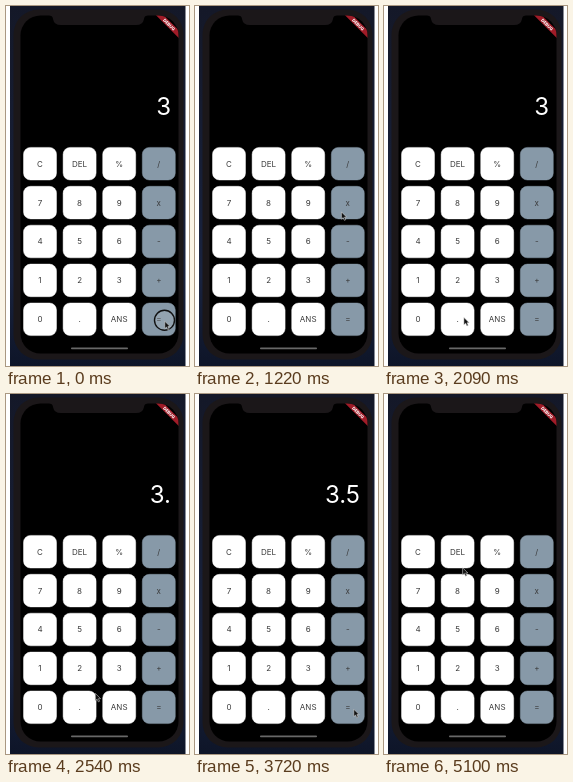
Recreate the animation shown at these times as an HTML page. Size 183 by 360 pixels, loop 5.17 s.

```html
<!DOCTYPE html>
<html lang="en">
<head>
<meta charset="utf-8">
<title>Calculator</title>
<style>
html, body { margin: 0; width: 100%; height: 100%; overflow: hidden; background: #fff; }
svg { display: block; width: 100vw; height: 100vh; }
text { font-family: Inter, Roboto, sans-serif; }
.key { font-size: 8px; fill: #3a3a3a; text-anchor: middle; }
#display { font-size: 24px; fill: #fff; text-anchor: end; }
#debug { font-size: 4.3px; font-weight: 800; fill: #fff; text-anchor: middle; }
</style>
</head>
<body>
<svg viewBox="0 0 183 360" preserveAspectRatio="none">
  <defs>
    <linearGradient id="desk" x1="0" y1="0" x2="0" y2="1">
      <stop offset="0" stop-color="#141828"/>
      <stop offset=".75" stop-color="#19233f"/>
      <stop offset="1" stop-color="#0e1528"/>
    </linearGradient>
    <clipPath id="screen"><rect x="14.5" y="9.5" width="158" height="338" rx="20"/></clipPath>
  </defs>
  <rect x="4" width="175.5" height="360" fill="url(#desk)"/>
  <rect x="7.5" y="3.5" width="170" height="350" rx="25" fill="#1b1719"/>
  <g clip-path="url(#screen)">
    <rect x="14" y="9" width="160" height="340"/>
    <g transform="translate(163.2 18.6) rotate(45)">
      <rect x="-22" y="-2.7" width="44" height="5.4" fill="#a01c28"/>
      <text id="debug" y="1.6">DEBUG</text>
    </g>
  </g>
  <path d="M43 9H142Q138 10 138 13Q137 19 130 19H55Q48 19 47 13Q47 10 43 9Z" fill="#1b1719"/>
  <g id="keys"></g>
  <rect x="65" y="341.5" width="57" height="1.7" rx=".8" fill="#686868"/>
  <text id="display" x="165" y="108.5"></text>
  <g id="pointer">
    <circle id="ring" cx="-.3" cy="-1" r="10" fill="#fff" fill-opacity=".1" stroke="#111" stroke-width="1.4"/>
    <path transform="scale(.88)" d="M0 0V8.3L2 6.5L3.4 9.6L4.9 8.9L3.5 6H6Z" fill="#111" stroke="#ddd" stroke-width=".6" stroke-linejoin="round"/>
  </g>
</svg>
<script>
const LOOP = 5170, HOLD = 140, MOVE = 420, SETTLE = 110;
const $ = id => document.getElementById(id);

const rows = ["C DEL % /", "7 8 9 x", "4 5 6 -", "1 2 3 +", "0 . ANS ="];
const centre = {};
$("keys").innerHTML = rows.map((row, r) => row.split(" ").map((label, c) => {
  const x = 34 + c * 39.6, y = 157.7 + r * 38.9, fill = c === 3 ? "#8799a8" : "#fff";
  centre[label] = [x, y];
  return `<rect x="${x - 16.5}" y="${y - 16.3}" width="33" height="32.6" rx="7"
      fill="${fill}" stroke="${fill}" stroke-opacity=".45"/>
    <text class="key" x="${x}" y="${y + 2.9}">${label}</text>`;
}).join("")).join("");

// Key, press time, where on the key the pointer lands, sideways bow of the way there
const step = (key, at, dx, dy, bow = 0) =>
  ({ key, at, bow, x: centre[key][0] + dx, y: centre[key][1] + dy });
const steps = [
  step("=", 0, 6, 2),
  step("x", 943, -3, 3, -25),
  step("3", 1680, -8, 8),
  step(".", 2290, 3, 2),
  step("5", 2948, 3, 3, 16),
  step("=", 3780, 6, 2),
  step("/", 4613, -3, 6, -10),
  step("DEL", 5210, 5, 16)
];

const ops = {
  "+": (a, b) => a + b, "-": (a, b) => a - b,
  "x": (a, b) => a * b, "/": (a, b) => a / b
};

// The calculator itself: 7 + 3 is waiting for its first "="
function readout(t) {
  let entry = "3", total = 7, op = "+";
  for (const { key, at } of steps) {
    if (at + HOLD > t) break;
    if (key === "=") entry = String(ops[op](total, +entry));
    else if (ops[key]) { total = +entry; op = key; entry = ""; }
    else entry += key;
  }
  return entry;
}

function pointerAt(t) {
  const i = Math.max(1, steps.findIndex(s => s.at > t));
  const a = steps[i - 1], b = steps[i];
  const u = Math.min(1, Math.max(0, (t - b.at + SETTLE + MOVE) / MOVE));
  const k = u * u * (3 - 2 * u);
  return [a.x + (b.x - a.x) * k + b.bow * Math.sin(Math.PI * u), a.y + (b.y - a.y) * k];
}

function draw(now) {
  const t = now % LOOP;
  const down = steps.some(s => t >= s.at && t < s.at + HOLD);
  $("pointer").setAttribute("transform", `translate(${pointerAt(t)})`);
  $("ring").setAttribute("visibility", down ? "visible" : "hidden");
  $("display").textContent = readout(t);
}

const start = performance.now();
function tick() {
  draw(performance.now() - start);
  requestAnimationFrame(tick);
}
tick();
</script>
</body>
</html>
```
